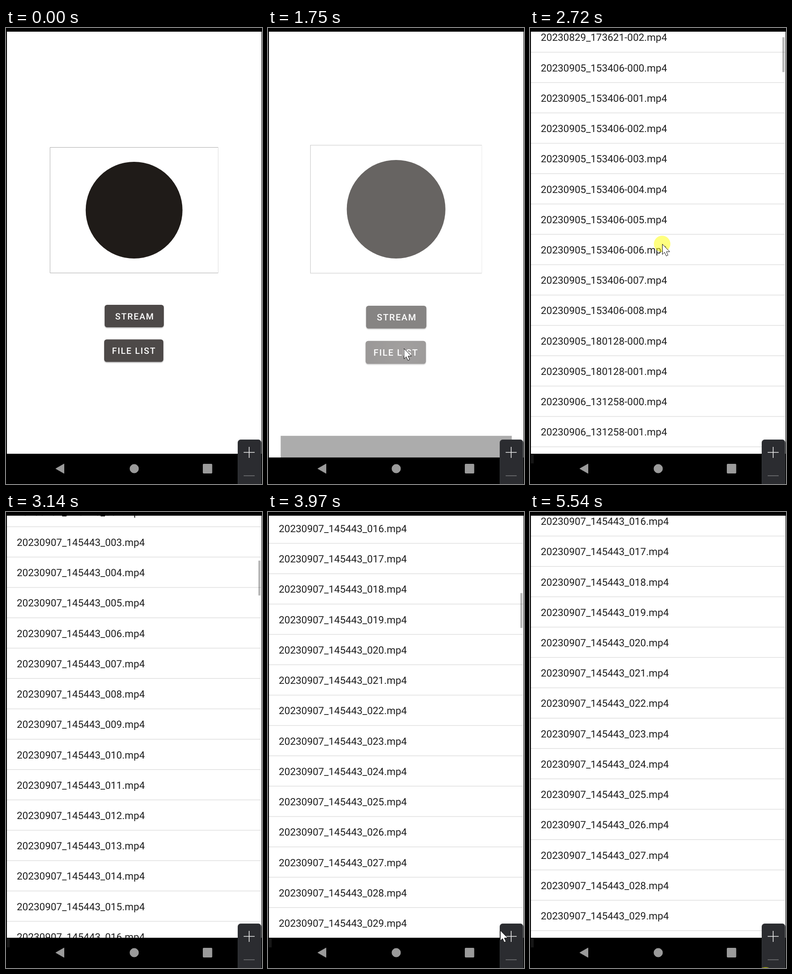
Animation, 558 px wide and 995 px high, one loop 5.61 s. Source, as an HTML page:

```html
<!DOCTYPE html>
<html lang="en">
<head>
<meta charset="utf-8">
<title>File list</title>
<style>
  html, body { margin: 0; width: 100%; height: 100%; overflow: hidden; background: #000; }
  svg { display: block; width: 100vw; height: 100vh; }
  text { font-family: Roboto, sans-serif; white-space: pre; text-rendering: geometricPrecision; }
  .label { font-size: 19.1px; font-weight: 500; letter-spacing: 1.7px; fill: #fff; }
  .row { font-size: 21.95px; fill: #1e1e1e; }
</style>
</head>
<body>
<svg viewBox="0 0 558 995" xmlns="http://www.w3.org/2000/svg">
  <defs>
    <clipPath id="screen"><rect x="2" y="8" width="555" height="987"/></clipPath>
    <clipPath id="view"><rect x="2" y="8" width="555" height="921"/></clipPath>
    <clipPath id="key"><rect x="214" y="679.5" width="129" height="49" rx="5.5"/></clipPath>
    <radialGradient id="glow">
      <stop offset="0" stop-color="#fff" stop-opacity=".23"/>
      <stop offset="1" stop-color="#fff" stop-opacity=".15"/>
    </radialGradient>
    <filter id="soft" x="-10%" y="-20%" width="120%" height="150%"><feGaussianBlur stdDeviation="1.2"/></filter>
  </defs>
  <rect width="558" height="995"/>
  <g clip-path="url(#screen)">
    <g id="home">
      <rect x="2" y="8" width="555" height="921" fill="#fff"/>
      <path d="M462.5 260.5H96V534.5H462.5" fill="none" stroke="#adadad"/>
      <path d="M462.5 261V534" stroke="#dcdcdc"/>
      <circle cx="279.2" cy="397.5" r="105.5" fill="#1f1b18"/>
      <g id="keys"></g>
      <g clip-path="url(#key)"><circle id="ripple" cx="296" cy="699" fill="url(#glow)"/></g>
      <text class="label" x="238" y="635.7">STREAM</text>
      <text class="label" x="231" y="711.2">FILE LIST</text>
    </g>
    <g id="files">
      <rect x="2" y="8" width="555" height="921" fill="#fff"/>
      <rect x="2" y="929" width="555" height="130"/>
      <g clip-path="url(#view)">
        <g id="rows"></g>
        <rect id="thumb" x="550" width="5" height="76" fill="#000" fill-opacity=".27"/>
      </g>
    </g>
  </g>
  <rect id="edge" x="2" y="930" width="6" height="20" fill="#161616"/>
  <g fill="#9b9b9b" stroke="#9b9b9b" stroke-linejoin="round">
    <path d="M108.5 961.5L126.5 951.2V971.8Z"/>
    <circle cx="279.5" cy="961.5" r="9.5"/>
    <rect x="429.5" y="951.5" width="19.5" height="20" rx="1"/>
  </g>
  <rect x="505.5" y="898.5" width="50.5" height="110" rx="6" fill="#2b2c30" stroke="#36383b"/>
  <path d="M518 926H542M530 914V938" stroke="#e6e6e6" stroke-width="1.6"/>
  <path d="M518 977H542" stroke="#737477" stroke-width="1.5"/>
  <g id="cursor">
    <circle id="press" r="18" fill="#ff0" fill-opacity=".5"/>
    <path d="M.5 .5V23L5.3 18.3L9 26.3L12.8 24.6L9.2 17H16.6Z" fill="#fff" stroke="#111"/>
  </g>
</svg>
<script>
const LOOP = 5610, ROW = 66.23, TOP = 8, CX = 279.5, CY = 505;
const RELEASE = 2930, STOP = 4400, DRAGGED = 522, REST = 2141.1;

const $ = id => document.getElementById(id);
const set = (id, name, value) => $(id).setAttribute(name, value);
const show = (id, on) => set(id, "visibility", on ? "visible" : "hidden");
const ramp = (t, a, b) => Math.min(1, Math.max(0, (t - a) / (b - a)));
const mix = (a, b, u) => a + (b - a) * u;
const within = (t, a, b) => t >= a && t < b;
const zoom = s => `translate(${CX} ${CY}) scale(${s}) translate(${-CX} ${-CY})`;

function add(parent, tag, attrs, text = "") {
  const el = document.createElementNS("http://www.w3.org/2000/svg", tag);
  for (const name in attrs) el.setAttribute(name, attrs[name]);
  el.textContent = text;
  $(parent).append(el);
}

for (const [x, y] of [[215, 604], [214, 679.5]]) {
  const box = { x, width: 129, height: 49, rx: 5.5 };
  add("keys", "rect", { ...box, y: y + 1.7, opacity: .3, filter: "url(#soft)" });
  add("keys", "rect", { ...box, y, fill: "#4d4948" });
}

// Recordings: shared prefix and number of parts
const batches = {
  "20230829_173621-": 3, "20230905_153406-": 9, "20230905_180128-": 2,
  "20230906_131258-": 2, "20230907_145443_": 34
};
let count = 0;
for (const [prefix, parts] of Object.entries(batches)) {
  for (let i = 0; i < parts; i++) {
    const y = TOP + count++ * ROW;
    add("rows", "text", { class: "row", x: 23.5, y: y + 41.8 }, prefix + String(i).padStart(3, "0") + ".mp4");
    add("rows", "rect", { x: 2, y: y + ROW - .7, width: 554, height: 1.4, fill: "#dedede" });
  }
}

function hold(t) {
  const step = 1000 / 14.4, phase = 1470;
  const tick = Math.floor((t - phase + 4) / step);
  return Math.round((phase + tick * step) / 10) * 10;
}

// Accelerating drag, then a fling that dies down
function scroll(t) {
  if (t < RELEASE) return DRAGGED * ramp(t, 2380, RELEASE) ** 2.54;
  return REST - (REST - DRAGGED) * (1 - ramp(t, RELEASE, STOP)) ** 3.76;
}

function pointer(t) {
  if (t >= 3340) {
    const left = (1 - ramp(t, 3340, 4110)) ** 1.3;
    return [513 - 65 * left, 1011 - 903 * left];
  }
  if (t >= 800) {
    const u = ramp(t, 2030, 2240);
    return [mix(296, 288, u), mix(699, 625, u) - scroll(t)];
  }
  const u = ramp(t, 130, 540);
  return [mix(363, 303, u), mix(767, 683, u)];
}

function draw(t) {
  const grow = 1 - (1 - ramp(t, 1690, 2030)) ** 2.5;
  set("home", "transform", zoom(1 + .05 * grow));
  set("files", "transform", zoom(.85 + .15 * grow));
  set("files", "opacity", ramp(t, 1717, 1820));
  set("ripple", "r", 105 * ramp(t, 1420, 1680));
  show("home", t < 2030);
  show("rows", t >= 1890);
  show("edge", t >= 1890);

  const s = scroll(t);
  set("rows", "transform", `translate(0 ${-s})`);
  set("thumb", "y", TOP + s * .0795);
  set("thumb", "opacity", t < 2450 ? 0 : 1 - ramp(t, 4600, 4880));

  set("cursor", "transform", `translate(${pointer(t)})`);
  show("cursor", t >= 130 && !within(t, 2950, 3340));
  set("press", "opacity", within(t, 1330, 1470) || within(t, 2310, 2950) || t >= 5500 ? 1 : 0);
}

const begin = performance.now();
function frame() {
  draw(hold((performance.now() - begin) % LOOP));
  requestAnimationFrame(frame);
}
frame();
</script>
</body>
</html>
```
